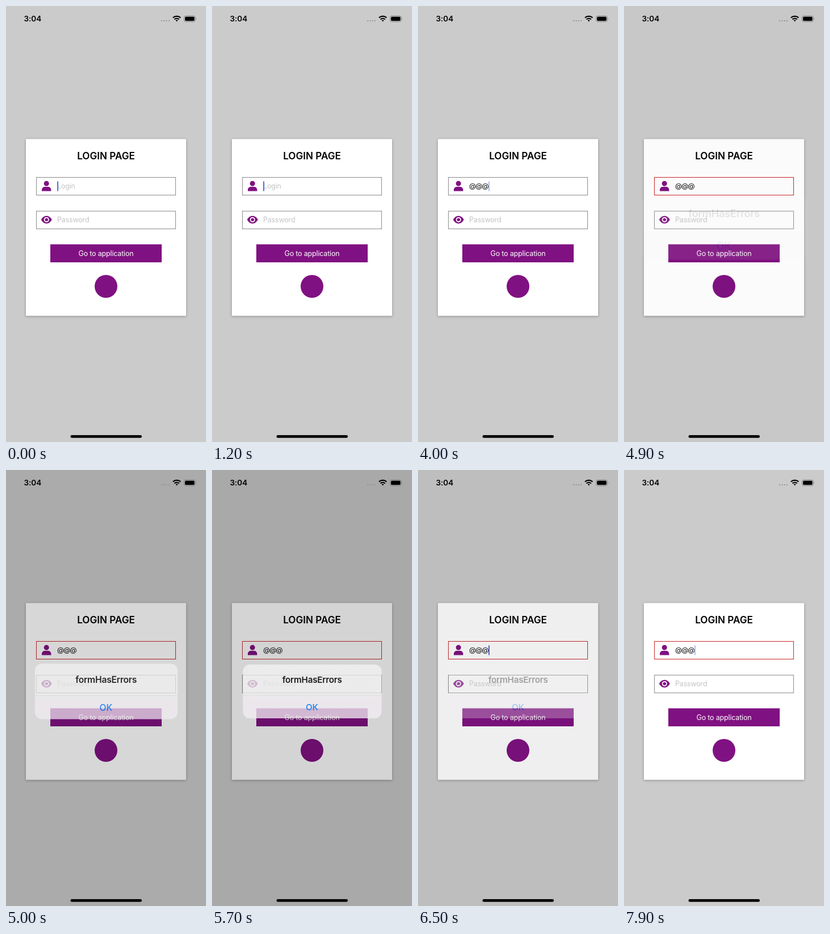
Recreate the animation shown at these times as an HTML page. Size 352 by 762 pixels, loop 8000 ms.

```html
<!DOCTYPE html>
<html lang="en">
<head>
<meta charset="utf-8">
<title>Login form</title>
<style>
  html, body { margin: 0; width: 100%; height: 100%; overflow: hidden; background: #cbcbcb; }
  svg { display: block; width: 100%; height: 100%; font-family: Inter, "Open Sans", sans-serif; }
  .field { fill: none; stroke: #8c8c8c; }
  .small { font-size: 12.5px; letter-spacing: -.18px; }
  .hint { fill: #c4c4c8; }
  .bold { font-weight: 600; }
  .mid { text-anchor: middle; }
  .purple { fill: #801182; }
  #card { filter: drop-shadow(0 1.5px 2px rgba(0, 0, 0, .32)); }
</style>
</head>
<body>
<svg viewBox="0 0 352 762">
  <defs>
    <linearGradient id="glass" x1="0" y1="0" x2="0" y2="1">
      <stop offset=".5" stop-color="#f3f3f3"/>
      <stop offset=".7" stop-color="#f3ecf3"/>
      <stop offset="1" stop-color="#f3eef3"/>
    </linearGradient>
  </defs>
  <rect width="352" height="762" fill="#cbcbcb"/>
  <rect id="card" x="35" y="232.5" width="282" height="309" rx="1" fill="#fff"/>
  <text class="bold mid" x="176" y="268" font-size="17.1">LOGIN PAGE</text>

  <rect id="loginBox" class="field" x="53.5" y="299.5" width="245" height="31"/>
  <g class="purple">
    <circle cx="71.2" cy="310.3" r="4.5"/>
    <path d="M63 323.4v-1.8c0-3.6 2.6-5.6 5.6-5.6h5.2c3 0 5.6 2 5.6 5.6v1.8z"/>
  </g>
  <text id="login" class="small" x="90" y="319.3"></text>
  <rect id="caret" y="306.5" width="1.8" height="17" fill="#4560d6"/>

  <rect class="field" x="53.5" y="358.5" width="245" height="31"/>
  <path class="purple" d="M61.8 373.5Q65.5 366.8 71.3 366.8T80.8 373.5Q77 380.2 71.3 380.2T61.8 373.5z"/>
  <circle cx="71.3" cy="373.5" r="4.5" fill="#fff"/>
  <circle class="purple" cx="71.3" cy="373.5" r="2.8"/>
  <text class="small hint" x="90" y="378.2">Password</text>

  <rect class="purple" x="78" y="416.5" width="196" height="31.5"/>
  <text class="small mid" x="176" y="436.7" fill="#fff">Go to application</text>
  <circle class="purple" cx="176" cy="490" r="20"/>

  <rect id="dim" width="352" height="762"/>

  <g id="alert">
    <rect x="54.5" y="340" width="244" height="94" rx="12" fill="url(#glass)" fill-opacity=".76"/>
    <path d="M54.5 394.2h244" stroke="#999" stroke-opacity=".3" stroke-width=".7"/>
    <text class="bold mid" x="176.2" y="372.3" font-size="15.2" letter-spacing="-.22" fill="#1c1c1c">formHasErrors</text>
    <text class="mid" x="176" y="419.6" font-size="15.2" font-weight="500" fill="#1a80f0">OK</text>
  </g>

  <text class="bold" x="31.5" y="27.3" font-size="13.6" letter-spacing="-.1">3:04</text>
  <path d="M274.3 25.8h14" stroke="#8f8f8f" stroke-width="2.2" stroke-linecap="round" stroke-dasharray="0 4.2"/>
  <g fill="none" stroke="#000" stroke-width="2.1">
    <path d="M293.9 20.6a9.6 9.6 0 0 1 13.4 0M296.5 23.4a5.8 5.8 0 0 1 8.2 0"/>
    <path d="M300.6 27.2l-2-2.1a2.9 2.9 0 0 1 4 0z" fill="#000" stroke="none"/>
  </g>
  <rect x="313.5" y="17.3" width="19.6" height="10.2" rx="3" fill="none" stroke="#777" stroke-width=".9"/>
  <rect x="315" y="18.8" width="16.6" height="7.2" rx="1.7"/>
  <path d="M334.2 20.7q1.5 1.7 0 3.4z" fill="#777"/>
  <rect x="113.5" y="750" width="125.5" height="4.8" rx="2.4"/>
</svg>
<script>
  const LOOP = 8000;
  const KEYS = [3100, 3500, 3700];
  // Moments at which the caret starts to go out, come back, go out, ...
  const BLINKS = [400, 800, 1400, 1800, 2400, 2800, 4000, 4200, 4600, 5050, 5600, 6000, 6600, 6900, 7500, 7900];
  const FADE = [[4800, 0], [4900, .09], [5000, .93], [5100, 1], [6400, 1], [6500, .37], [6600, .1], [6800, 0]];
  const ZOOM = [[4900, 1.2], [5000, 1.03], [5100, 1.008], [5200, 1]];
  const $ = id => document.getElementById(id);
  const set = (id, attrs) => {
    for (const k in attrs) $(id).setAttribute(k, attrs[k]);
  };

  function track(points, t) {
    if (t <= points[0][0]) return points[0][1];
    for (let i = 1; i < points.length; i++) {
      const [t0, a] = points[i - 1], [t1, b] = points[i];
      if (t < t1) return a + (b - a) * (t - t0) / (t1 - t0);
    }
    return points[points.length - 1][1];
  }

  function caretOpacity(t) {
    const passed = BLINKS.filter(b => b <= t);
    if (!passed.length) return 1;
    if (t - passed[passed.length - 1] < 100) return .45;
    return passed.length % 2 ? 0 : 1;
  }

  function render(t) {
    const typed = KEYS.filter(k => k <= t).length;
    const login = $('login');
    login.textContent = typed ? '@'.repeat(typed) : 'Login';
    login.style.fill = typed ? '#111' : '#c4c4c8';
    login.style.letterSpacing = typed ? '-.8px' : '';
    set('caret', { x: 90.2 + typed * 11.3, opacity: caretOpacity(t) });
    $('loginBox').style.stroke = t >= 4800 ? '#c9282c' : '';

    const fade = track(FADE, t);
    const zoom = track(ZOOM, t);
    set('dim', { opacity: .168 * fade });
    set('alert', {
      opacity: fade,
      transform: `translate(176.5 387) scale(${zoom}) translate(-176.5 -387)`
    });
  }

  const start = performance.now();
  function tick() {
    render((performance.now() - start) % LOOP);
    requestAnimationFrame(tick);
  }
  tick();
</script>
</body>
</html>
```
